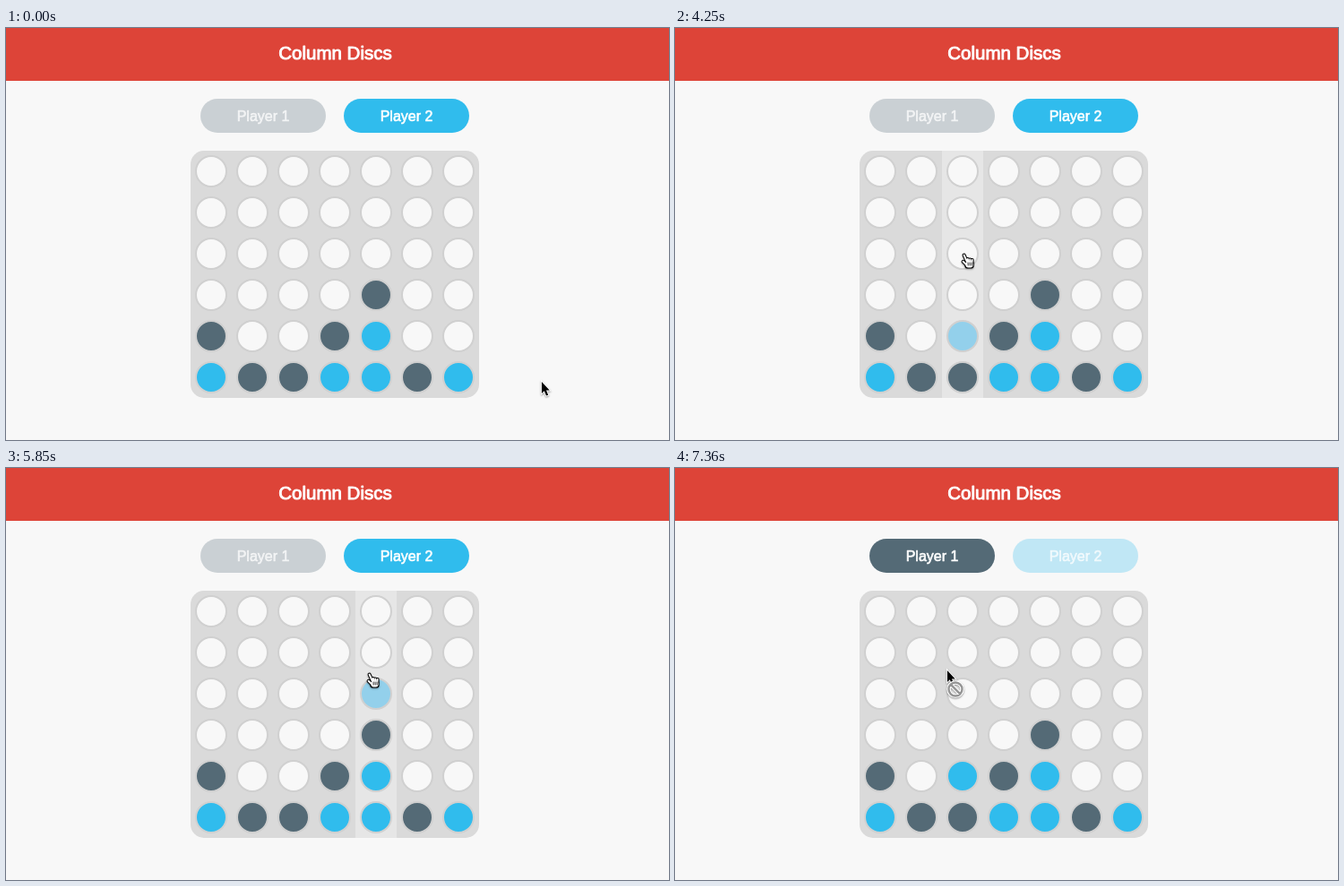
These frames come from a looping animation (740x460 px, 8000 ms). An HTML page with a canvas:

```html
<!DOCTYPE html>
<html lang="en">
<head>
<meta charset="utf-8">
<title>Column Discs</title>
<style>
  html, body { margin: 0; width: 740px; height: 460px; overflow: hidden; background: #f8f8f8; }
  canvas { display: block; }
</style>
</head>
<body>
<canvas id="stage" width="740" height="460"></canvas>
<script>
const ctx = document.getElementById('stage').getContext('2d');
const LOOP = 8000, TICK = 90;
const HOVER = 3710, CLICK = 6740, DENIED = 7360;
const CELL = 46, LEFT = 206, TOP = 137, COLS = 7, ROWS = 6;
const PAPER = '#f8f8f8', SLATE = '#546a76', BLUE = '#30bced';
const FONT = '"Liberation Sans", Arial, sans-serif';

// Discs in each column from the bottom up, by player.
const STACKS = ['21', '1', '1', '21', '221', '1', '2'];

// The pointer glides from rest to rest, bending towards `via` where given.
const REST = [596, 394];
const MOVES = [
  { start: 1350, end: 1890, to: [330, 263], via: [830, 454] },
  { start: 2790, end: 3060, to: [327, 262] },
  { start: 3420, end: 3420, to: [332, 258] },
  { start: HOVER, end: 3890, to: [330, 255] },
  { start: 4250, end: 5050, to: [278, 238], via: [300, 244] },
  { start: 5140, end: 5500, to: [446, 229], via: [297, 232] },
  { start: 5850, end: 6300, to: [301, 227] },
  { start: DENIED, end: DENIED, to: [302, 225] }
];

const ARROW = new Path2D('M1.9 .9V14L4.8 11.3L7 16.6L9.2 15.7L7 10.5H10.7Z');

const lerp = (a, b, u) => a + (b - a) * u;
const easeOut = u => 1 - (1 - u) ** 2;

// Progress in whole ticks: the first tick already shows some change.
function progress(t, start, end) {
  const ticks = Math.round((end - start) / TICK) + 1;
  const done = Math.floor((t - start) / TICK + 0.06) + 1;
  return Math.min(1, done / ticks);
}

function pointerAt(t) {
  let from = REST;
  for (const { start, end, to, via } of MOVES) {
    if (t < start) break;
    const u = easeOut(progress(t, start, end));
    from = to.map((goal, i) => {
      const bend = via ? via[i] : (from[i] + goal) / 2;
      return Math.round(lerp(lerp(from[i], bend, u), lerp(bend, goal, u), u));
    });
  }
  return from;
}

function label(text, x, y, size, weight) {
  ctx.font = `${size}px ${FONT}`;
  ctx.textAlign = 'center';
  ctx.fillStyle = ctx.strokeStyle = '#fff';
  ctx.lineWidth = weight;
  ctx.lineJoin = 'round';
  ctx.fillText(text, x, y);
  ctx.strokeText(text, x, y);
}

function roundBox(x, y, w, h, r, color) {
  ctx.fillStyle = color;
  ctx.beginPath();
  ctx.roundRect(x, y, w, h, r);
  ctx.fill();
}

function button(text, x, color, active) {
  ctx.globalAlpha = lerp(0.28, 1, active);
  roundBox(x, 79, 140, 38, 19, color);
  ctx.globalAlpha = lerp(0.7, 1, active);
  label(text, x + 70, 104, 16, 0.6);
  ctx.globalAlpha = 1;
}

function disc(col, row, color) {
  ctx.beginPath();
  ctx.arc(LEFT + CELL * (col + 0.5), TOP + CELL * (row + 0.5), 17, 0, Math.PI * 2);
  ctx.fillStyle = color;
  ctx.fill();
  ctx.strokeStyle = '#d0d0d0';
  ctx.lineWidth = 2;
  ctx.stroke();
}

function drawBoard(t, hoverCol) {
  roundBox(LEFT, TOP, CELL * COLS, CELL * ROWS, 15, '#dadada');
  if (hoverCol >= 0) {
    ctx.fillStyle = '#e6e6e6';
    ctx.fillRect(LEFT + CELL * hoverCol, TOP, CELL, CELL * ROWS);
  }
  STACKS.forEach((stack, col) => {
    const discs = t >= CLICK && col === 2 ? stack + '2' : stack;
    for (let level = 0; level < ROWS; level++) {
      const ghost = col === hoverCol && level === discs.length;
      const fill = ghost ? '#93d0eb' : { 1: SLATE, 2: BLUE }[discs[level]] || PAPER;
      disc(col, ROWS - 1 - level, fill);
    }
  });
}

function shadow(on) {
  ctx.shadowColor = on ? 'rgba(0,0,0,.4)' : 'transparent';
  ctx.shadowBlur = on ? 2 : 0;
  ctx.shadowOffsetY = on ? 1 : 0;
}

function drawArrow() {
  ctx.lineWidth = 1.8;
  ctx.lineJoin = 'miter';
  ctx.strokeStyle = '#fff';
  ctx.fillStyle = '#000';
  shadow(true);
  ctx.stroke(ARROW);
  shadow(false);
  ctx.fill(ARROW);
}

// Fingers are round-capped strokes over a palm: a wide black pass, then a white one.
function drawHand() {
  const fingers = new Path2D('M3.6 2.6L7 10M2.6 9.8L6 13');
  const creases = new Path2D();
  for (let i = 0; i < 3; i++) {
    fingers.moveTo(7.8 + i * 2.4, 7 + i * 0.5);
    fingers.lineTo(8.6 + i * 1.9, 11);
    creases.moveTo(8 + i * 2, 11);
    creases.lineTo(8.2 + i * 2, 14);
  }
  ctx.lineCap = 'round';
  for (const [grow, color] of [[1, '#000'], [0, '#fff']]) {
    shadow(grow);
    ctx.strokeStyle = color;
    ctx.lineWidth = 2 + grow * 2;
    ctx.stroke(fingers);
    roundBox(5.4 - grow, 10 - grow, 8.2 + grow * 2, 6.4 + grow * 2, 3, color);
  }
  ctx.strokeStyle = '#000';
  ctx.lineWidth = 0.8;
  ctx.stroke(creases);
}

function drawDenied() {
  const sign = new Path2D('M5.7 16.7L16.3 27.3');
  sign.moveTo(18.5, 22);
  sign.arc(11, 22, 7.5, 0, Math.PI * 2);
  ctx.fillStyle = '#ececec';
  ctx.fill(sign);
  for (const [width, color] of [[4.6, '#fff'], [2.4, '#959595']]) {
    shadow(color === '#fff');
    ctx.lineWidth = width;
    ctx.strokeStyle = color;
    ctx.stroke(sign);
  }
  shadow(false);
}

function draw(t) {
  const [px, py] = pointerAt(t);
  const hovering = t >= HOVER && t < CLICK;
  const hoverCol = hovering ? Math.floor((px + 5 - LEFT) / CELL) : -1;
  const turn = t < CLICK ? 0 : progress(t, CLICK, 7090);

  ctx.fillStyle = PAPER;
  ctx.fillRect(0, 0, 740, 460);
  ctx.fillStyle = '#dd4438';
  ctx.fillRect(0, 0, 740, 59);
  label('Column Discs', 367.5, 35, 20.5, 0.95);
  button('Player 1', 217, SLATE, turn);
  button('Player 2', 377, BLUE, 1 - turn);
  drawBoard(t, hoverCol);

  ctx.save();
  ctx.translate(px, py);
  if (t >= HOVER && t < DENIED) drawHand();
  else drawArrow();
  if (t >= DENIED) drawDenied();
  ctx.restore();
}

const begin = performance.now();
function tick() {
  draw((performance.now() - begin) % LOOP);
  requestAnimationFrame(tick);
}
tick();
</script>
</body>
</html>
```
